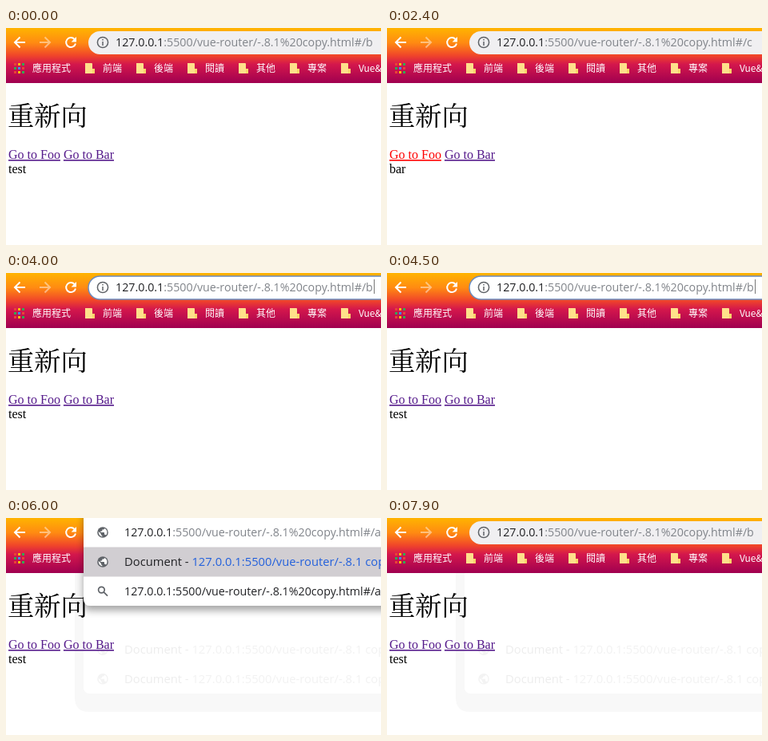
Write an HTML page that moves like this. It is 469x272 px and loops after 8000 ms.

```html
<!DOCTYPE html>
<html lang="zh-Hant">
<head>
<meta charset="utf-8">
<title>Vue Router</title>
<style>
html, body { margin: 0; width: 100%; height: 100%; overflow: hidden; background: #fff; }
svg { display: block; width: 469px; height: 272px; }
text { white-space: pre; }
.ui { font: 14.25px "Open Sans", "Noto Sans", sans-serif; fill: #202124; }
.row { font-size: 14.75px; }
.dim { fill: #80848a; }
.url { fill: #2260dc; }
.mark { font: 12px "Noto Sans CJK TC", "Noto Sans CJK", "Open Sans", sans-serif; fill: #fff; }
.page { font: 16px "Liberation Serif", serif; }
.link { fill: #551a8b; text-decoration: underline; }
.title { font: 300 33.3px "Noto Serif CJK TC", "Noto Sans CJK TC", "Noto Sans CJK", serif; }
</style>
</head>
<body>
<svg viewBox="0 0 469 272" xmlns="http://www.w3.org/2000/svg">
  <defs>
    <linearGradient id="sky" x2="0" y2="1">
      <stop offset="0" stop-color="#ffb400"/>
      <stop offset=".27" stop-color="#ff8a12"/>
      <stop offset=".5" stop-color="#f0452a"/>
      <stop offset=".66" stop-color="#d4174c"/>
      <stop offset="1" stop-color="#a00050"/>
    </linearGradient>
    <filter id="shadow" filterUnits="userSpaceOnUse" x="60" y="-40" width="460" height="320">
      <feDropShadow dx="0" dy="6" stdDeviation="5" flood-color="#000" flood-opacity=".35"/>
    </filter>
    <g id="globe">
      <circle r="6.8" fill="#5f6368"/>
      <path d="M-5.3-1.2L-2 2V2.7Q-2 4-.7 4.1V5.4Q-5.6 4.4-5.3-1.2M2-5Q5.4-3.6 5.4 0 5.4 2.2 4 3.7 3.6 2.7 2.7 2.7H2V.7Q2 0 1.4 0H-2.7V-1.4H-1.4Q-.7-1.4-.7-2V-3.4H.7Q2-3.4 2-5" fill="#fff"/>
    </g>
    <g id="lens" fill="none" stroke="#5f6368" stroke-width="1.7">
      <circle cx="-1.6" cy="-1.6" r="3.8"/><path d="M1.2 1.2L6 6"/>
    </g>
    <g id="folder">
      <path d="M0 0H8Q9 0 9 1V7H12V12Q12 13 11 13H0Z" fill="#ffe08a"/>
      <path d="M9 7H12V12Q12 13 11 13H9Z" fill="#f9d56a"/>
    </g>
    <path id="arrow" d="M7 0H-6M.5-6.5L-6 0 .5 6.5" fill="none" stroke="#fff" stroke-width="2"/>
  </defs>

  <rect width="469" height="272" fill="#fff"/>
  <g id="ghost">
    <path d="M86 69H97V212Q97 220 105 220H469V243H104Q86 243 86 225Z" fill="#f8f8f8"/>
    <g id="ghostRows" opacity=".08"></g>
  </g>

  <text class="title" x="2" y="122">重新向</text>
  <text class="page link" id="foo" x="3" y="164">Go to Foo</text>
  <text class="page link" x="71.9" y="164">Go to Bar</text>
  <text class="page" id="view" x="3" y="182"></text>

  <rect width="469" height="69" fill="url(#sky)"/>
  <use href="#arrow" x="17" y="18"/>
  <use href="#arrow" transform="translate(49 18) scale(-1 1)" opacity=".45"/>
  <path d="M85.6 14A6 6 0 1 0 87 19.5" fill="none" stroke="#fff" stroke-width="2"/>
  <path d="M88 11V17.4H81.6Z" fill="#fff"/>
  <rect id="hover" x="413" y="41.5" width="64" height="22" rx="11" fill="#fff" opacity=".14"/>
  <g id="marks"></g>

  <g id="popup">
    <rect id="panel" x="97" y="-20" width="400" rx="8" fill="#fff" filter="url(#shadow)"/>
    <rect x="97" y="36.5" width="372" height="37" fill="#d1ced2"/>
    <use href="#globe" x="121" y="18"/>
    <text class="ui" id="input" x="148" y="23"></text>
    <rect id="popCaret" x="462" y="9" width="1" height="18" fill="#777"/>
    <g id="rows"></g>
  </g>

  <g id="omni">
    <rect x="103" y="4" height="29" width="400" rx="14.5" id="box" stroke-width="1.5"/>
    <g fill="none" stroke="#5f6368" stroke-width="1.5">
      <circle cx="121" cy="18" r="6.6"/>
      <path d="M121 17V22M121 14V15.6"/>
    </g>
    <rect id="pick" x="137" y="8" width="323" height="20" fill="#0078d7"/>
    <text class="ui" id="addr" x="137" y="23"></text>
    <rect id="caret" x="460" y="8" width="1" height="18" fill="#777"/>
  </g>
</svg>
<script>
const $ = id => document.getElementById(id);
const show = (id, on) => { $(id).style.display = on ? '' : 'none'; };
const set = (id, attrs) => { for (const k in attrs) $(id).setAttribute(k, attrs[k]); };

const LOOP = 8000;
const host = '127.0.0.1';
const path = ':5500/vue-router/-.8.1%20copy.html#/';
const plain = host + path.replace('%20', ' ');
const address = end => `${host}<tspan class="dim">${path}${end}</tspan>`;

const rowY = i => 55 + 36.7 * i;
const icon = (name, i) => `<use href="#${name}" x="121" y="${rowY(i)}"/>`;
const label = (html, i, cls = 'ui row') =>
  `<text class="${cls}" x="148" y="${rowY(i) + 5}">${html}</text>`;
const pageRow = (i, end = '') => icon('globe', i) +
  label(`Document - <tspan class="url">${plain}${end}</tspan>`, i);
const searchRow = (i, text) => icon('lens', i) + label(text, i, 'ui');

const longList = icon('globe', 0) + label(plain, 0, 'ui row url') +
  searchRow(1, host + path + ' - ') + [2, 3, 4].map(i => pageRow(i)).join('');
const shortList = pageRow(0, 'a') + searchRow(1, host + path + 'a');

function drawMarks() {
  const colors = ['#ea4335', '#fbbc05', '#34a853', '#4285f4'];
  let html = '';
  for (let i = 0; i < 9; i++) {
    const x = i % 3, y = (i - x) / 3;
    html += `<rect x="${10 + x * 5}" y="${44 + y * 5}" width="3" height="3" fill="${colors[(x + y * 2) % 4]}"/>`;
  }
  html += '<text class="mark" x="33" y="55">應用程式</text>';
  ['前端', '後端', '閱讀', '其他', '專案', 'Vue&amp;'].forEach((name, i) => {
    const x = 99 + 64 * i;
    html += `<use href="#folder" x="${x}" y="44"/><text class="mark" x="${x + 22}" y="55">${name}</text>`;
  });
  $('marks').innerHTML = html;
}

const cache = {};
function fill(id, html) {
  if (cache[id] !== html) $(id).innerHTML = cache[id] = html;
}

function render(t) {
  const within = (a, b) => t >= a && t < b;

  // Page
  const onBar = within(1200, 2500);
  fill('view', onBar ? 'bar' : 'test');
  $('foo').style.fill = within(2400, 2500) ? '#f00' : '';
  show('hover', within(3300, 3400));

  // Address bar
  const focused = within(4000, 6800);
  const picked = within(4100, 4500);
  const tone = focused ? '#fff' : within(3600, 4000) ? '#f7f7f8' : '#f0eff1';
  set('box', { fill: tone, stroke: focused ? '#6b8cc0' : 'none' });
  const end = onBar ? 'c' : within(5500, 6800) ? '' : 'b';
  fill('addr', picked ? `<tspan fill="#fff">${host + path + end}</tspan>` : address(end));
  show('pick', picked);
  show('caret', within(4000, 4100) || within(4500, 5000));

  // Suggestions
  const open = within(5600, 6800);
  const typed = t >= 6000;
  show('popup', within(5500, 6900));
  show('omni', !open);
  set('popup', { opacity: open ? 1 : t < 5600 ? .5 : .42 });
  set('panel', { height: typed ? 130 : 241 });
  fill('input', address(typed ? 'a' : ''));
  fill('rows', typed ? shortList : longList);
  show('popCaret', !typed);
  show('ghost', typed);
}

drawMarks();
$('ghostRows').innerHTML = pageRow(3) + pageRow(4);
$('ghostRows').style.filter = 'grayscale(1)';

const start = performance.now();
function tick() {
  render((performance.now() - start) % LOOP);
  requestAnimationFrame(tick);
}
tick();
</script>
</body>
</html>
```
